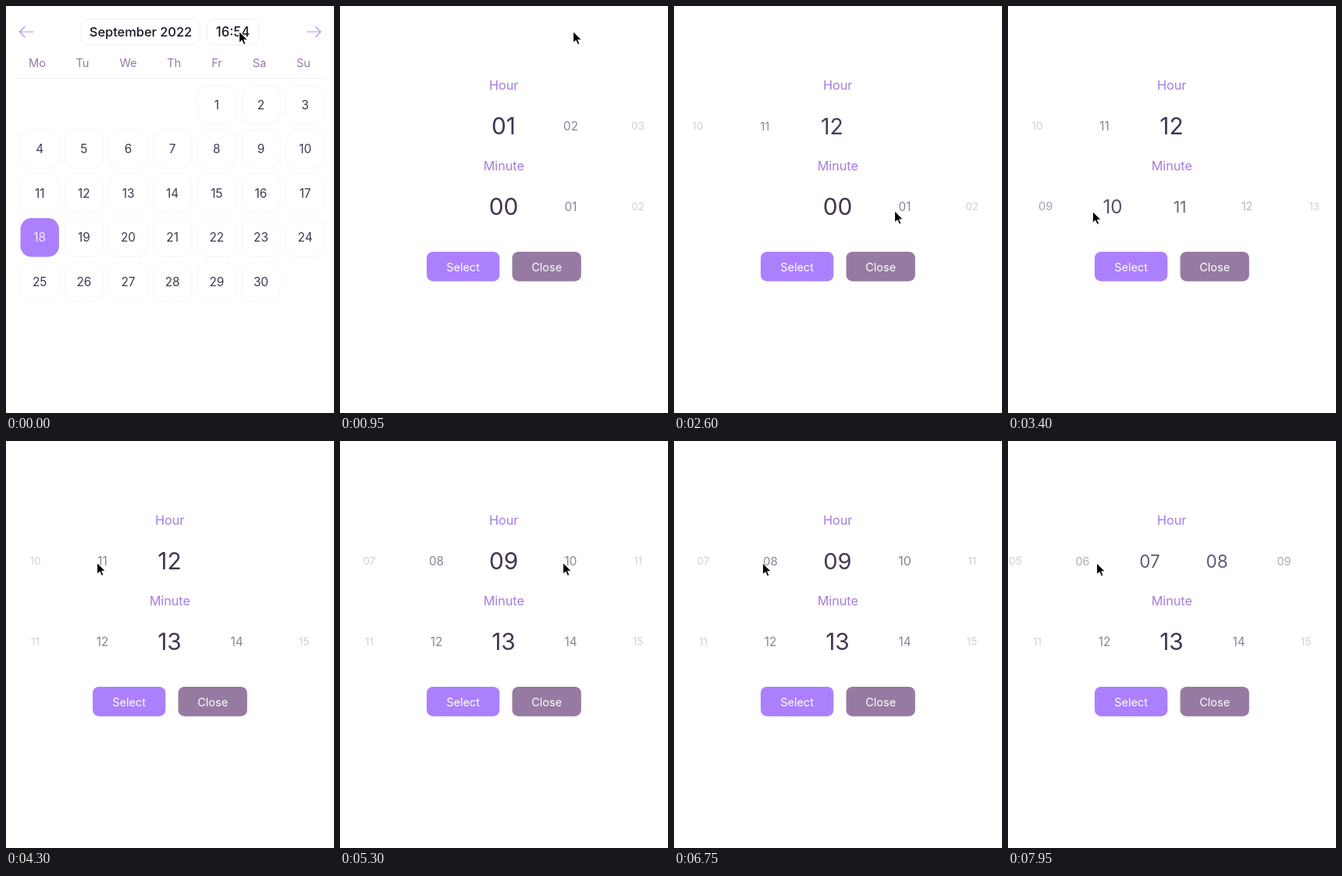
These frames come from a looping animation (420x520 px, 8000 ms). An HTML page:

```html
<!DOCTYPE html>
<html lang="en">
<head>
<meta charset="utf-8">
<title>Date and time picker</title>
<style>
  html, body { margin: 0; width: 100%; height: 100%; overflow: hidden; background: #fff; }
  svg { display: block; width: 420px; height: 520px; font-family: Inter, "Liberation Sans", sans-serif; }
  text { text-anchor: middle; }
</style>
</head>
<body>
<svg id="stage" viewBox="0 0 420 520"></svg>
<script>
const LOOP = 8000, CENTER = 209.5, GAP = 86;
const INK = '#43354f', VIOLET = '#ac80fd', MAUVE = '#967aa2', LILAC = '#a67cdf';
const stage = document.getElementById('stage');

function add(parent, tag, attrs, content) {
  const el = document.createElementNS('http://www.w3.org/2000/svg', tag);
  for (const key in attrs) el.setAttribute(key, attrs[key]);
  if (content !== undefined) el.textContent = content;
  parent.appendChild(el);
  return el;
}

// Text centred on (x, y) by the height of its capitals
function label(parent, x, y, size, fill, content, weight = 400) {
  return add(parent, 'text', { x, y: y + size * 0.364, 'font-size': size, fill, 'font-weight': weight }, content);
}

function box(parent, x, y, width, height, rx, fill, stroke = 'none') {
  return add(parent, 'rect', { x, y, width, height, rx, fill, stroke });
}

const pad = n => String(n).padStart(2, '0');

function buildCalendar() {
  const g = add(stage, 'g', {});
  const arrow = { fill: 'none', stroke: '#b592e8', 'stroke-width': 1.2, 'stroke-linecap': 'round', 'stroke-linejoin': 'round' };
  add(g, 'path', { d: 'M35 33H17.5M24 26.5L17.5 33L24 39.5', ...arrow });
  add(g, 'path', { d: 'M385.5 33H403M396.5 26.5L403 33L396.5 39.5', ...arrow });
  box(g, 96, 16.5, 152.5, 33, 10, '#fff', '#f0eef2');
  box(g, 257.5, 16.5, 66, 33, 10, '#fff', '#f0eef2');
  label(g, 172.5, 33, 16.4, '#1c1424', 'September 2022', 500);
  label(g, 290.5, 33, 16.6, '#1c1424', '16:54', 500);
  const days = { Mo: 40, Tu: 98, We: 156.5, Th: 215, Fr: 270, Sa: 324.5, Su: 381 };
  for (const day in days) label(g, days[day], 73, 14.6, MAUVE, day);
  add(g, 'path', { d: 'M10 92.5H410', stroke: '#f1eff3' });
  for (let day = 1; day <= 30; day++) {
    const slot = day + 3;
    const x = 43.2 + 56.65 * (slot % 7), y = 126 + 56.6 * Math.floor(slot / 7);
    const chosen = day === 18;
    box(g, x - 24.7, y - 24.7, 49.4, 49.4, 14, chosen ? VIOLET : '#fff', chosen ? 'none' : '#f6f4f7');
    label(g, x, y, 15.3, chosen ? '#f3eaff' : INK, day);
  }
}

function buildPicker() {
  const g = add(stage, 'g', {});
  box(g, 0, 0, 420, 520, 0, '#fff');
  label(g, 209.7, 101.5, 16.2, LILAC, 'Hour');
  label(g, 209.8, 204, 16.2, LILAC, 'Minute');
  box(g, 111, 314, 93.3, 37.7, 8, VIOLET);
  box(g, 220.5, 314, 88.3, 37.7, 8, MAUVE);
  label(g, 157.5, 333.3, 14.5, '#fff', 'Select');
  label(g, 264.7, 333.3, 14.5, '#fff', 'Close');
  return g;
}

function buildWheel(parent, y, first, last) {
  const items = [];
  for (let n = first; n <= last; n++) items.push({ n, y, el: label(parent, 0, y, 16, INK, pad(n)) });
  return items;
}

buildCalendar();
const picker = buildPicker();
const hours = buildWheel(picker, 153.5, 1, 12);
const minutes = buildWheel(picker, 256, 0, 59);
const pointer = add(stage, 'path', {
  d: 'M0 0V15.5L3.6 12.2L5.9 17.4L8.5 16.3L6.3 11.2H11Z',
  fill: '#000', stroke: '#fff', 'stroke-width': 1.1, 'stroke-linejoin': 'round'
});

const ease = {
  smooth: p => p * p * (3 - 2 * p),
  push: p => p ** 1.6,
  glide: p => 1 - (1 - p) ** 3
};

// Keys: [time, [values], easing into this key]
const pointerKeys = [
  [1000, [298.5, 32]], [1350, [325, 102]], [1520, [318, 152]],
  [1800, [105, 157], 'push'], [2150, [205, 247]], [2420, [286, 267]],
  [2600, [282.5, 261.5]], [2700, [282, 261.5]], [3000, [112, 262], 'push'],
  [3480, [108, 262]], [3850, [112, 164]], [4300, [116.5, 155]],
  [4500, [116.5, 155]], [4880, [285.5, 155], 'push'],
  [5800, [285.5, 155]], [6150, [113.5, 155.5]]
];
const hourKeys = [
  [1520, [1]], [1800, [3.5], 'push'], [2380, [12.125], 'glide'], [2950, [12]],
  [4500, [12]], [4880, [10.05], 'push'], [5300, [9], 'glide'],
  [5640, [9]], [5975, [10]], [6425, [10]], [6755, [9]],
  [6995, [9]], [7380, [8]], [7745, [8]], [8078, [7]]
];
const minuteKeys = [[2700, [0]], [3000, [2], 'push'], [3950, [13], 'glide']];

function sample(keys, t) {
  if (t <= keys[0][0]) return keys[0][1];
  const i = keys.findIndex(key => key[0] > t);
  if (i < 0) return keys[keys.length - 1][1];
  const [t0, from] = keys[i - 1], [t1, to, kind = 'smooth'] = keys[i];
  const p = ease[kind]((t - t0) / (t1 - t0));
  return from.map((v, k) => v + (to[k] - v) * p);
}

function mix(stops, d) {
  const i = Math.min(Math.floor(d), stops.length - 2);
  return stops[i] + (stops[i + 1] - stops[i]) * Math.min(d - i, 1);
}

// Sizes and tints trail slightly behind the sliding positions
function drawWheel(items, keys, t) {
  const [pos] = sample(keys, t), [trail] = sample(keys, t - 40);
  for (const { n, y, el } of items) {
    const x = CENTER + GAP * (n - pos);
    const visible = x > -30 && x < 450;
    el.setAttribute('display', visible ? 'inline' : 'none');
    if (!visible) continue;
    const d = Math.abs(n - trail), size = mix([29.8, 15.2, 13.5], d);
    el.setAttribute('x', x);
    el.setAttribute('y', y + size * 0.364);
    el.setAttribute('font-size', size);
    el.setAttribute('fill-opacity', mix([1, 0.62, 0.24], d));
  }
}

function draw(t) {
  picker.setAttribute('opacity', ease.smooth(Math.min(Math.max((t - 480) / 320, 0), 1)));
  drawWheel(hours, hourKeys, t);
  drawWheel(minutes, minuteKeys, t);
  pointer.setAttribute('transform', `translate(${sample(pointerKeys, t).join(' ')})`);
}

const start = performance.now();
function tick() {
  draw((performance.now() - start) % LOOP);
  requestAnimationFrame(tick);
}
draw(0);
requestAnimationFrame(tick);
</script>
</body>
</html>
```
